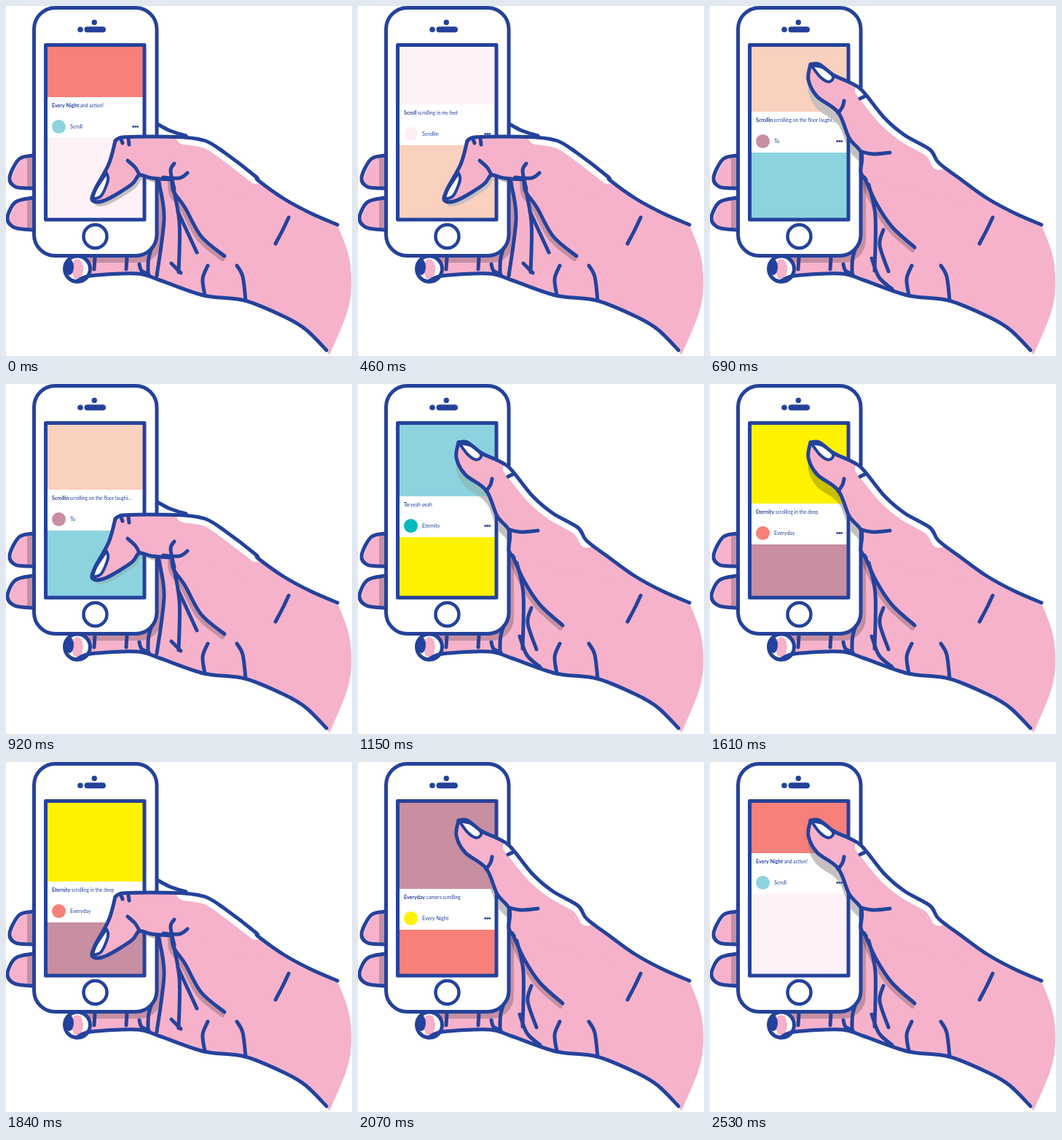
These frames come from a looping animation (475x480 px, 2760 ms). An HTML page with a canvas:

```html
<!DOCTYPE html>
<html lang="en">
<head>
<meta charset="utf-8">
<style>
html, body { margin: 0; width: 100%; height: 100%; overflow: hidden; background: #fff; }
canvas { display: block; }
</style>
</head>
<body>
<canvas id="stage" width="475" height="480"></canvas>
<script>
const ctx = document.getElementById('stage').getContext('2d');
const INK = '#24429b', PINK = '#f6b2cb', SHADE = 'rgba(0,0,0,.2)', CAST = '#c6c0c2';
const STEP = 230, STEPS = 12;

// image colour, caption (bold + plain), avatar colour
const posts = [
  ['#f7807a', 'Every Night', 'and action!', '#fff200'],
  ['#fef2f8', 'Scroll', 'scrolling in my feet', '#8dd3df'],
  ['#fad0be', 'Scrollin', 'scrolling on the floor laughi...', '#fdeef5'],
  ['#8dd3df', 'To', 'yeah yeah', '#c88ea1'],
  ['#fff200', 'Eternity', 'scrolling in the deep', '#00b9bd'],
  ['#c88ea1', 'Everyday', 'camera scrolling', '#f7807a']
];

// Smooth curve through "x,y x,y"; "|" makes a sharp corner.
function curve(text) {
  const path = new Path2D();
  text.split('|').forEach((part, i) => {
    const p = part.trim().split(' ').map(s => s.split(',').map(Number));
    path[i ? 'lineTo' : 'moveTo'](...p[0]);
    for (let j = 0; j < p.length - 1; j++) {
      const a = p[j - 1] || p[j], b = p[j], c = p[j + 1], d = p[j + 2] || c;
      path.bezierCurveTo(b[0] + (c[0] - a[0]) / 6, b[1] + (c[1] - a[1]) / 6,
        c[0] - (d[0] - b[0]) / 6, c[1] - (d[1] - b[1]) / 6, ...c);
    }
  });
  return path;
}

const reversed = text => text.split(' ').reverse().join(' ');

function rect(x, y, w, h, r = 0) {
  const path = new Path2D();
  path.roundRect(x, y, w, h, r);
  return path;
}

function oval(x, y, rx, ry = rx) {
  const path = new Path2D();
  path.ellipse(x, y, rx, ry, 0, 0, 7);
  return path;
}

function fill(path, color, dx = 0, dy = 0) {
  ctx.save();
  ctx.translate(dx, dy);
  ctx.fillStyle = color;
  ctx.fill(path);
  ctx.restore();
}

function line(path, width = 5, color = INK) {
  ctx.lineWidth = width;
  ctx.strokeStyle = color;
  ctx.stroke(path);
}

function clipped(area, paint) {
  ctx.save();
  ctx.clip(area);
  paint();
  ctx.restore();
}

// Parts of the hand that both poses share
const forearm = '346,239 381,264 418,284 455,300';
const wrist = '455,300 472,350 471,410 444,479';
const under = '440,472 412,444 384,427 328,404 272,397 211,376 180,367 116,370 97,378';
const fingers = ['37,205 18,210 5,235 13,248 37,250', '37,263 13,269 2,291 12,304 37,307'].map(curve);
const creases = ['388,290 380,307 370,326', '277,356 270,374 273,397', '317,356 325,371 329,404',
  '122,345 121,361', '166,345 165,361', '183,354 186,363 196,368', '204,322 196,345 195,369'].map(curve);

// Each hand: thumb underside, its top up to the ridge, the ridge, and folds
function makeHand({ thumb, start, ridge, fold, nail, cast, lines }) {
  const top = `${start} ${ridge} ${forearm}`;
  return {
    cast,
    top: curve(top),
    thumb: curve(thumb),
    front: curve(`${reversed(thumb)} | ${top}`),
    skin: curve(`${top} | ${wrist} | ${under} | 95,340 190,320`),
    ridge: curve(ridge),
    fold: curve(fold),
    nail: curve(nail),
    lines: lines.map(curve)
  };
}

const hands = [
  makeHand({
    thumb: '150,185 141,217 122,252 119,267 137,266 172,245 183,232 200,236 228,238',
    start: '150,185 160,180 200,179',
    ridge: '244,180 274,185 300,201 343,234',
    fold: '228,238 230,254 246,277 268,316 300,343',
    nail: '119,265 123,252 138,229 | 138,229 140,239 131,260 119,265',
    cast: [4, 6],
    lines: ['208,162 225,171 247,178', '158,183 160,188', '168,182 169,190',
      '167,212 177,221 183,231', '231,216 226,226 231,251', '249,229 238,236 216,235',
      '209,238 217,290 207,370', '228,241 238,297 237,365', '236,282 262,338', '227,353 240,366']
  }),
  makeHand({
    thumb: '138,80 135,101 147,124 176,146 191,181 208,202 207,228 214,238',
    start: '138,80 150,80 170,95 190,104',
    ridge: '209,116 239,153 267,177 302,197 314,215',
    fold: '212,235 228,270 250,303 281,331',
    nail: '139,81 151,97 163,104 169,97 156,85 139,81',
    cast: [0, 17],
    lines: ['184,130 182,138 176,147', '206,127 214,123', '208,200 224,203 247,201',
      '218,245 227,288 226,363', '238,307 233,328 245,364', '222,346 232,372 250,388']
  })
];

const body = rect(38.5, 2.5, 168.5, 340, 29);
const glass = rect(54.5, 53.5, 135.5, 239.5);

function label(text, x, y, size, weight = 400) {
  ctx.font = `${weight} ${size}px Lato, sans-serif`;
  ctx.fillStyle = INK;
  ctx.fillText(text, x, y);
  return x + ctx.measureText(text).width;
}

function drawFeed(index) {
  const [color, title, text] = posts[index];
  const [nextColor, name, , avatar] = posts[(index + 1) % posts.length];
  const y = Math.floor(125.5 + 9.8 * index);
  fill(rect(56, 55, 133, y - 55), color);
  fill(rect(56, y + 56, 133, 236 - y), nextColor);
  const end = label(title, 63, y + 14, 7.1, 700);
  label(text, end + 1.6, y + 14, 6.7);
  fill(oval(72.5, y + 40.5, 9.5), avatar);
  label(name, 88, y + 43, 7.1);
  for (let i = 0; i < 3; i++) fill(oval(174.7 + 3 * i, y + 40.5, 1.4), INK);
}

function drawBack(hand) {
  const skin = new Path2D(hand.skin);
  fill(hand.skin, PINK);
  for (const finger of fingers) {
    skin.addPath(finger);
    fill(finger, PINK, 3, 1);
  }
  clipped(skin, () => fill(rect(29, 3, 185, 349, 31), SHADE));
  fingers.forEach(f => line(f));
  ctx.save();
  ctx.translate(-3, 4);
  line(hand.fold, 6, SHADE);
  ctx.restore();

  const tip = oval(98, 360.5, 17.5);
  fill(tip, '#fff');
  fill(oval(98, 361, 8, 14), PINK);
  clipped(tip, () => fill(oval(87, 358, 6, 11), INK));
  line(tip);
  line(curve(under));
  creases.forEach(c => line(c));
}

function drawPhone(index) {
  fill(body, '#fff');
  line(body);
  drawFeed(index);
  line(glass);
  line(oval(122.5, 316, 16), 4.5);
  fill(oval(121.3, 22.5, 3.7), INK);
  fill(oval(102, 32.3, 3.8), INK);
  fill(rect(107.5, 28.2, 29.5, 8, 4), INK);
}

function drawFront(hand) {
  clipped(body, () => {
    ctx.globalCompositeOperation = 'darken';
    fill(hand.front, CAST, ...hand.cast);
  });
  fill(hand.front, PINK);
  clipped(hand.skin, () => line(hand.ridge, 20, '#fff'));
  fill(hand.nail, '#fff');
  line(hand.nail, 4);
  for (const path of [hand.thumb, hand.top, hand.fold, ...hand.lines]) line(path);
}

function draw(now) {
  const step = Math.floor(now / STEP) % STEPS;
  const hand = hands[step % 2];
  const index = Math.floor((step + 1) / 2) % posts.length;
  ctx.lineCap = ctx.lineJoin = 'round';
  ctx.fillStyle = '#fff';
  ctx.fillRect(0, 0, 475, 480);
  drawBack(hand);
  drawPhone(index);
  drawFront(hand);
}

const start = performance.now();
function tick() {
  draw(performance.now() - start);
  requestAnimationFrame(tick);
}
tick();
</script>
</body>
</html>
```
